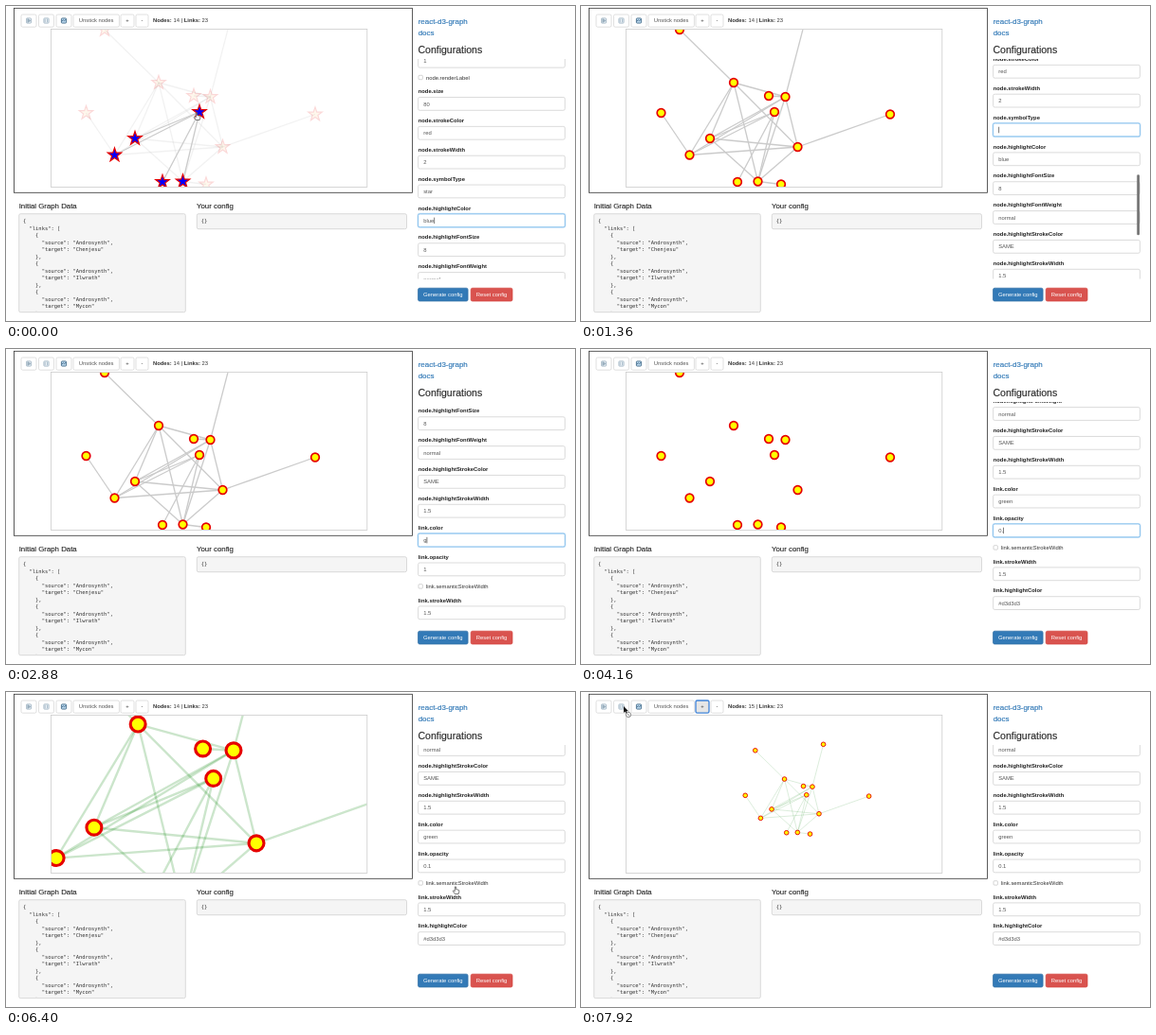
Write an HTML page that moves like this. It is 600x333 px and loops after 8000 ms.

```html
<!DOCTYPE html>
<html lang="en">
<head>
<meta charset="utf-8">
<title>Graph playground</title>
<style>
  html, body { margin: 0; width: 100%; height: 100%; overflow: hidden; background: #fff; }
  svg { display: block; width: 100%; height: 100%; }
  text { font: 5.85px "Liberation Sans", Arial, sans-serif; fill: #333; white-space: pre; }
  .bold { font-weight: bold; }
  .label { font-weight: bold; fill: #222; }
  .link { font-size: 7.95px; fill: #337ab7; stroke: #337ab7; stroke-width: .18; }
  .heading { font-size: 7.85px; fill: #222; stroke: #222; stroke-width: .12; }
  .title { font-size: 10.5px; fill: #222; stroke: #222; stroke-width: .12; }
  .code { font: 5.45px "DejaVu Sans Mono", monospace; }
  .value { fill: #555; }
  .white { fill: #fff; }
  .mid { text-anchor: middle; }
</style>
</head>
<body>
<svg id="stage" viewBox="0 0 600 333" preserveAspectRatio="none">
  <defs>
    <clipPath id="graphClip"><rect x="48" y="25" width="332.5" height="166"/></clipPath>
    <clipPath id="formClip"><rect x="430" y="56" width="165" height="232.5"/></clipPath>
    <clipPath id="codeClip"><rect x="14" y="220" width="175" height="103"/></clipPath>
  </defs>
</svg>
<script>
const DURATION = 8000, STEP = 80;
const stage = document.getElementById('stage');

function add(parent, tag, attrs = {}, content) {
  const el = document.createElementNS('http://www.w3.org/2000/svg', tag);
  set(el, attrs);
  if (content !== undefined) el.textContent = content;
  parent.appendChild(el);
  return el;
}
function set(el, attrs) {
  for (const key in attrs) el.setAttribute(key, attrs[key]);
}
const text = (parent, x, y, content, cls = '') => add(parent, 'text', { x, y, class: cls }, content);
const box = (parent, x, y, width, height, fill, stroke = 'none', rx = 0, sw = .7) =>
  add(parent, 'rect', { x, y, width, height, fill, stroke, rx, 'stroke-width': sw });

// Value of the last step that has started
const held = (steps, t) => steps.reduce((value, step) => step[0] <= t ? step[1] : value, steps[0][1]);

// Eased interpolation between steps of [time, ...numbers]
function tween(steps, t) {
  const next = steps.findIndex(step => step[0] > t);
  if (next === 0) return steps[0].slice(1);
  if (next < 0) return steps[steps.length - 1].slice(1);
  const a = steps[next - 1], b = steps[next];
  const p = (t - a[0]) / (b[0] - a[0]), e = p * p * (3 - 2 * p);
  return a.slice(1).map((v, i) => v + (b[i + 1] - v) * e);
}

// Graph panel
box(stage, 8.5, 2.3, 420, 195, '#fff', '#333', 0, .8);
const graph = add(add(stage, 'g', { 'clip-path': 'url(#graphClip)' }), 'g');
box(stage, 47.5, 24.5, 333.3, 167, 'none', '#ccc', 0, .8);

const nodes = {
  A: [104, 25], B: [161, 81], C: [198, 95], D: [215.5, 96], E: [204, 112], F: [326, 114.5], G: [84.5, 113],
  H: [136, 140], I: [114.5, 157.5], J: [228.5, 149], K: [165, 186], L: [186.5, 185.5], M: [211, 188.5], N: [237, 13]
};
const pairs = 'AB DN JF GI BD BH BL BJ HD HE HJ ID IE IJ LD LE LJ LH DJ KE LM CD BI'.split(' ');
const links = pairs.map(pair => {
  const [[x1, y1], [x2, y2]] = [...pair].map(id => nodes[id]);
  return { pair, el: add(graph, 'line', { x1, y1, x2, y2, 'stroke-width': 1.3 }) };
});

const starPath = 'M' + Array.from({ length: 10 }, (_, i) => {
  const r = i % 2 ? 3 : 7.6, a = i * Math.PI / 5;
  return (r * Math.sin(a)).toFixed(2) + ' ' + (-r * Math.cos(a)).toFixed(2);
}).join('L') + 'Z';
const circlePath = 'M0-4.3A4.3 4.3 0 1 1 0 4.3A4.3 4.3 0 1 1 0-4.3Z';
const marks = Object.entries(nodes).map(([id, [x, y]]) => ({
  id, el: add(graph, 'path', { transform: `translate(${x} ${y})` })
}));

// Toolbar
function button(x, width, label, faded) {
  const frame = box(stage, x, 9, width, 13.2, '#fff', '#ccc', 1.6, .6);
  if (label) text(stage, x + width / 2, 17.4, label, 'mid' + (faded ? ' value' : ''));
  return frame;
}
['M22.8 13.6L26 15.5L22.8 17.4Z', 'M41.2 13.8V17.2M43.6 13.8V17.2', 'M58.7 16.2L60.4 14.8L61.6 15.8L63.2 14'].forEach((d, i) => {
  const x = 16 + i * 18.5;
  button(x, 16);
  const g = add(stage, 'g', { opacity: i < 2 ? .5 : 1 });
  box(g, x + 5.4, 12.9, 5.2, 5.2, i < 2 ? '#dce9f2' : '#b9d6ec', '#35607f', .8, .8);
  add(g, 'path', { d, fill: i ? 'none' : '#35607f', stroke: '#35607f', 'stroke-width': .8 });
});
button(71, 48.4, 'Unstick nodes', true);
const plus = button(121, 14, '+');
button(137, 13, '-');
const counter = text(stage, 155, 17.2, '');
add(counter, 'tspan', { class: 'bold' }, 'Nodes:');
const nodeCount = add(counter, 'tspan');
add(counter, 'tspan', { class: 'bold' }, 'Links:');
add(counter, 'tspan', {}, ' 23');

// Data panels
text(stage, 13.7, 214, 'Initial Graph Data', 'heading');
text(stage, 201, 214, 'Your config', 'heading');
box(stage, 13.7, 219.7, 175.6, 104, '#f5f5f5', '#ccc', 1.7);
box(stage, 201.3, 219.7, 221.2, 16, '#f5f5f5', '#ccc', 1.7);
text(stage, 205.7, 229.3, '{}', 'code');
const code = add(stage, 'g', { 'clip-path': 'url(#codeClip)' });
const entries = ['Chenjesu', 'Ilwrath', 'Mycon'].flatMap(name =>
  ['    {', '      "source": "Androsynth",', `      "target": "${name}"`, '    },']);
['{', '  "links": [', ...entries].forEach((line, i) => text(code, 18, 229.2 + i * 7.5, line, 'code'));

// Settings
text(stage, 434.7, 18.7, 'react-d3-graph', 'link');
text(stage, 434.7, 31, 'docs', 'link');
text(stage, 434.5, 49.7, 'Configurations', 'title');
const formArea = add(stage, 'g', { 'clip-path': 'url(#formClip)' });
const form = add(formArea, 'g');
const thumb = box(formArea, 586.2, 0, 2.8, 64, '#777', 'none', 1.4);

function field(name, y, value) {
  if (name) text(form, 434.7, y + 2, name, 'label');
  const glow = box(form, 434.6, y + 6.3, 154.8, 13.8, 'none', '#66afe9', 1.7, 2.2);
  glow.setAttribute('opacity', 0);
  const frame = box(form, 434.6, y + 6.3, 154.8, 13.8, '#fff', '#ccc', 1.7);
  const content = text(form, 440.2, y + 15.3, value, 'value');
  const caret = add(form, 'path', { stroke: '#222', 'stroke-width': .6 });
  return { glow, frame, content, caret, y };
}
function checkbox(name, y) {
  const frame = box(form, 435, y - 2.3, 4.4, 4.4, '#fff', '#aaa', .9, .5);
  const tick = add(form, 'path', { d: `M436 ${y}l1 1.1l1.6-2.4`, fill: 'none', stroke: '#fff', 'stroke-width': .7 });
  text(form, 443, y + 2, name);
  return { frame, tick };
}
field('', 45, '1');
checkbox('node.renderLabel', 75.6);
const fields = {};
[
  ['node.size', '80'], ['node.strokeColor', 'red'], ['node.strokeWidth', '2'], ['node.symbolType', 'star'],
  ['node.highlightColor', 'blue'], ['node.highlightFontSize', '8'], ['node.highlightFontWeight', 'normal'],
  ['node.highlightStrokeColor', 'SAME'], ['node.highlightStrokeWidth', '1.5'],
  ['link.color', '#d3d3d3'], ['link.opacity', '1']
].forEach(([name, value], i) => fields[name] = field(name, 90.2 + i * 30.85, value));
const semantic = checkbox('link.semanticStrokeWidth', 430);
field('link.strokeWidth', 444.6, '1.5');
field('link.highlightColor', 475.4, '#d3d3d3');

box(stage, 434.5, 298.2, 52.6, 13.8, '#337ab7', '#2e6da4', 1.7);
text(stage, 460.8, 307.2, 'Generate config', 'mid white');
box(stage, 490.2, 298.2, 43.8, 13.8, '#d9534f', '#d43f3a', 1.7);
text(stage, 512.1, 307.2, 'Reset config', 'mid white');

// Pointers
const pointer = add(stage, 'g');
const ink = { fill: '#fff', stroke: '#222', 'stroke-width': .6, 'stroke-linejoin': 'round' };
const shapes = {
  hand: add(pointer, 'path', { ...ink, d: 'M-.7 0Q0-.8 .6 0V2.6L3.4 3.3Q4 3.6 3.8 5L3.2 7.5H-.6L-2.8 4.4Q-2.6 3.3-.7 4.5Z' }),
  arrow: add(pointer, 'path', { ...ink, fill: '#111', stroke: '#fff', d: 'M0 0V7L1.6 5.6L2.7 8L3.9 7.5L2.8 5.2H5Z' }),
  ban: add(pointer, 'g')
};
add(shapes.ban, 'path', { fill: '#111', d: 'M0 0V7L1.6 5.6L2.7 8L3.9 7.5L2.8 5.2H5Z' });
add(shapes.ban, 'circle', { cx: 5, cy: 9, r: 2.7, fill: '#fff', stroke: '#888', 'stroke-width': .9 });
add(shapes.ban, 'path', { d: 'M3.2 7.2L6.8 10.8', stroke: '#888', 'stroke-width': .9 });

// Timeline
const scrollSteps = [[0, 0], [960, 0], [1200, 65], [1840, 65], [2320, 179], [3600, 179], [3840, 220], [4560, 220], [4720, 228]];
const zoomSteps = [[0, 1, 0, 0], [5440, 1, 0, 0], [5920, 1.85, -158.7, -115.8], [6560, 1.85, -158.7, -115.8], [7120, .54, 127.6, 48.3]];
const pointerSteps = [
  [0, 201, 113], [160, 201, 113], [640, 470, 198], [1840, 470, 198], [2320, 500, 202], [3600, 500, 202], [3840, 500, 193],
  [4560, 500, 193], [4800, 470, 203], [5200, 470, 203], [5440, 187, 136], [5920, 187, 136], [6160, 474, 206],
  [6400, 474, 206], [6560, 277, 105], [7120, 277, 105], [7440, 128, 15], [7680, 128, 15], [7920, 45, 15]
];
const pointerKind = [
  [0, 'hand'], [320, 'arrow'], [880, ''], [1840, 'arrow'], [2560, ''], [3600, 'arrow'], [3920, ''],
  [4560, 'arrow'], [4720, 'hand'], [5280, 'arrow'], [6080, 'hand'], [6480, 'arrow'], [7360, 'hand'], [7760, 'arrow'], [7920, 'ban']
];
const focusSteps = [
  [0, 'node.highlightColor'], [720, 'node.symbolType'], [2480, 'link.color'], [3840, 'link.opacity'], [4800, '']
];
const typing = {
  'node.symbolType': [[0, 'star'], [1200, '']],
  'link.color': [[0, '#d3d3d3'], [2640, ''], [2800, 'g'], [2960, 'gr'], [3120, 'gre'], [3200, 'gree'], [3360, 'green']],
  'link.opacity': [[0, '1'], [3920, ''], [4000, '0'], [4080, '0.'], [4400, '0.1']]
};

function drawGraph(t) {
  const [scale, x, y] = tween(zoomSteps, t);
  set(graph, { transform: `translate(${x} ${y}) scale(${scale})` });
  const hover = t < 320;
  const near = id => id === 'E' || pairs.some(pair => pair.includes('E') && pair.includes(id));
  const stroke = t < 3360 ? '#cbcbcb' : 'green';
  const opacity = held([[0, 1], [3920, 0], [4400, .2]], t);
  for (const { pair, el } of links)
    set(el, { stroke, opacity: hover && !pair.includes('E') ? .25 : opacity });
  for (const { id, el } of marks) {
    const lit = hover && near(id);
    set(el, {
      d: t < 1200 ? starPath : circlePath,
      fill: lit ? '#00f' : '#ff0', stroke: '#e60000', 'stroke-width': t < 1200 ? 1.2 : 1.7,
      opacity: hover && !lit ? .15 : 1
    });
    if (hover && !lit) set(el, { fill: '#fc8' });
  }
}

function drawForm(t) {
  const [scroll] = tween(scrollSteps, t);
  set(form, { transform: `translate(0 ${-scroll})` });
  const scrolling = [[960, 1600], [1840, 2640], [3600, 4000], [4560, 5120]].some(([a, b]) => t >= a && t < b);
  set(thumb, { y: 160 + scroll * .282, opacity: scrolling ? 1 : 0 });
  const focus = held(focusSteps, t);
  for (const name in fields) {
    const { glow, frame, content, caret, y } = fields[name];
    if (typing[name]) content.textContent = held(typing[name], t);
    const active = name === focus;
    set(glow, { opacity: active ? .35 : 0 });
    set(frame, { stroke: active ? '#66afe9' : '#ccc' });
    const end = 440.6 + content.getComputedTextLength();
    set(caret, { d: active ? `M${end} ${y + 10}v6.5` : '' });
  }
  const checked = t >= 4880 && t < 6160;
  set(semantic.frame, { fill: checked ? '#3b82e6' : '#fff', stroke: checked ? '#3b82e6' : '#aaa' });
  set(semantic.tick, { opacity: checked ? 1 : 0 });
}

function drawPointer(t) {
  const [x, y] = tween(pointerSteps, t), kind = held(pointerKind, t);
  set(pointer, { transform: `translate(${x} ${y})` });
  for (const name in shapes) set(shapes[name], { visibility: name === kind ? 'visible' : 'hidden' });
}

const start = performance.now();
function draw() {
  const elapsed = Math.max(0, performance.now() - start) % DURATION;
  const t = Math.floor(elapsed / STEP) * STEP;
  drawGraph(t);
  drawForm(t);
  drawPointer(t);
  const added = t >= 7680;
  nodeCount.textContent = ` ${added ? 15 : 14} | `;
  set(plus, { fill: added ? '#e6e6e6' : '#fff', stroke: added ? '#3f83d8' : '#ccc', 'stroke-width': added ? 1.3 : .6 });
  requestAnimationFrame(draw);
}
draw();
</script>
</body>
</html>
```
